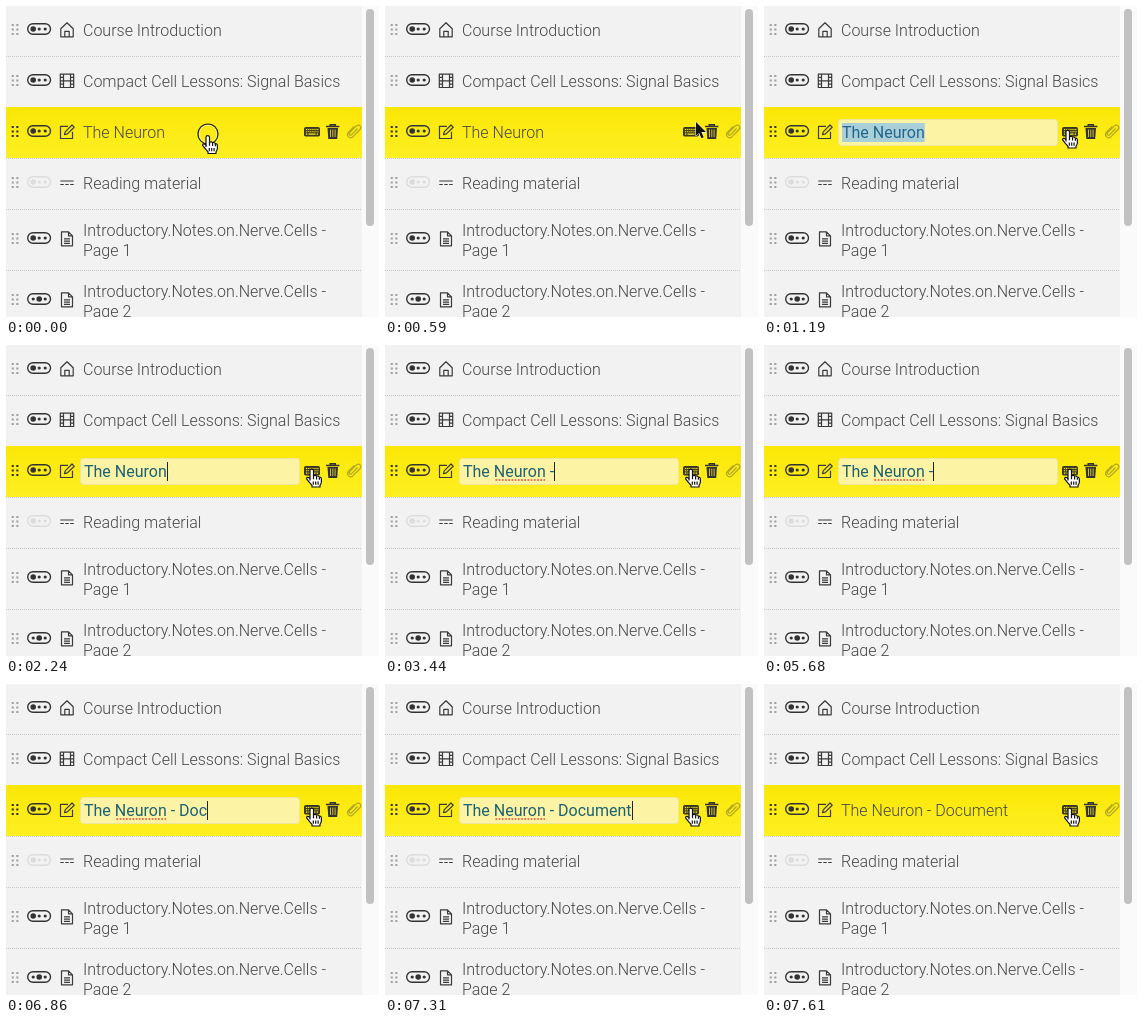
Animation of 373x311 px, one loop 8 s. Source, as an HTML page:

```html
<!DOCTYPE html>
<html lang="en">
<head>
<meta charset="utf-8">
<title>Course outline</title>
<style>
html, body { margin: 0; width: 100%; height: 100%; overflow: hidden; background: #fafafa; }
svg { display: block; }
text { font: 300 16px Roboto, "Open Sans", sans-serif; fill: #464646; white-space: pre; }
#entry { font-weight: 400; }
.icon { fill: none; stroke: #3a3a3a; stroke-width: 1.2; stroke-linejoin: round; }
.sep { stroke: #c8c8c8; stroke-dasharray: 1 1; }
</style>
</head>
<body>
<svg width="373" height="311" viewBox="0 0 373 311">
  <defs>
    <linearGradient id="glow" x2="0" y2="1">
      <stop stop-color="#fbe706"/><stop offset="1" stop-color="#fdef22"/>
    </linearGradient>
  </defs>
  <rect width="356" height="311" fill="#f2f2f2"/>
  <rect x="360" y="3" width="8" height="217" rx="4" fill="#c1c1c1"/>
  <rect y="101" width="356" height="51" fill="url(#glow)"/>
  <path class="sep" d="M0 50.5H356M0 152.5H356M0 203.5H356M0 264.5H356"/>
  <g id="rows"></g>

  <!-- row tools -->
  <g transform="translate(298 121)">
    <rect x=".5" y=".5" width="15" height="8.5" rx="1" fill="#4a4510" stroke="#333"/>
    <path d="M2 2.5H15M2 4.7H15" stroke="#f5e630" stroke-width="1.1" stroke-dasharray="1.2 .9"/>
    <path d="M2 7.1h1.3M4.5 7.1h7M12.7 7.1h1.3" stroke="#f5e630" stroke-width="1.1"/>
  </g>
  <path d="M321.5 122H332L331.2 133H322.3Z" fill="#333"/>
  <path d="M324.5 123.5v7.5M326.8 123.5v7.5M329.1 123.5v7.5" stroke="#f5e630" stroke-width=".8"/>
  <path d="M320 120.6H333.4M324.3 120.5v-1.8h5v1.8" fill="none" stroke="#333" stroke-width="1.5"/>
  <path class="icon" opacity=".38" d="M351.5 122.5l-6 6.3q-1.2 1-2-.1t.2-2l6.6-6.8q2.2-1.7 3.8 0t0 3.6l-7.3 7.4q-2.5 1.8-4.4-.2t.1-4.5l5.7-5.8"/>

  <text id="label" x="77" y="132"></text>
  <g id="field">
    <rect x="74.5" y="113.5" width="219" height="26" rx="3" fill="#fcf3a4" stroke="#f0e6a0"/>
    <rect id="selection" x="78" y="117" height="19" fill="#a9d0d8"/>
    <text id="entry" x="78" y="132"></text>
    <path id="squiggle" d="M110.5 135H160" stroke="#e8453a" stroke-width="1.6" stroke-dasharray="1.7 1.5"/>
    <rect id="caret" y="117" width="1" height="19" fill="#222"/>
  </g>

  <g id="pointer">
    <g id="ring" fill="none">
      <circle r="9" cy="-1.5" stroke="#fff" stroke-opacity=".6"/>
      <circle r="10" cy="-1.5" stroke="#222" stroke-width="1.2"/>
    </g>
    <g id="hand" stroke="#111" stroke-width="1.2" stroke-linejoin="round">
      <path fill="#fff" d="M-2 1.7Q-2 .2-.3 .2T1.5 1.7V6.8Q3.6 5.7 4.6 7.2 6.6 6.5 7.4 8.2 9.4 8 9.4 10.4V13Q9 15 8 16.3V18H0V16.3Q-3 13-5.4 9.8-5.2 7-2 9.6Z"/>
      <path fill="none" d="M-2 9.5v2M1.5 6.8v3.4M4.6 7.4v3M7.4 8.4v2.4M1.3 12.5v3.2M3.7 12.5v3.2M6.1 12.5v3.2"/>
    </g>
    <path id="arrow" fill="#111" stroke="#fff" paint-order="stroke" d="M0 0V13.8L3.1 11 5.4 16.2 7.7 15.2 5.4 10.1H10Z"/>
  </g>
</svg>
<script>
const $ = id => document.getElementById(id);
const show = (id, on) => $(id).setAttribute("visibility", on ? "inherit" : "hidden");

const icons = {
  home: "M-6.2-1L0-7 6.2-1V7H-6.2ZM-2.2 7V1.5H2.2V7",
  film: "M-6.7-6.7H6.7V6.7H-6.7ZM-3.5-6.7V6.7M3.5-6.7V6.7M-6.7 0H6.7M-6.7-3.4h3.2M-6.7 3.4h3.2M3.5-3.4h3.2M3.5 3.4h3.2",
  edit: "M1-5.5H-6.5V6.7H5.5V0M-2.5 2.8L-1.8 0 5-6.8 7.2-4.6 .4 2.1Z",
  rule: "M-6.7-1.8H6.7M-6.7 1.7h3.5M-1.7 1.7h3.4M3.2 1.7h3.5",
  page: "M-5.5-7H1.5L5.5-3V7H-5.5ZM1.5-7V-3H5.5M-3 0H3M-3 2.3H3M-3 4.5H3"
};
// centre, icon, active toggle dot, first baseline, lines of text
const rows = [
  [23.5, "home", 0, 30, "Course Introduction"],
  [74.5, "film", 0, 81, "Compact Cell Lessons: Signal Basics"],
  [125.5, "edit", 0, 132],
  [176.5, "rule", 0, 183, "Reading material"],
  [232.5, "page", 0, 230, "Introductory.Notes.on.Nerve.Cells -", "Page 1"],
  [293.5, "page", 1, 291, "Introductory.Notes.on.Nerve.Cells -", "Page 2"]
];
$("rows").innerHTML = rows.map(([y, icon, active, base, ...lines]) => {
  const ink = icon == "rule" ? "#dcdcdc" : "#333";
  const grip = [-4.5, 0, 4.5].map(d =>
    `<path d="M5.7 ${d}h2.1M10.3 ${d}h2.1" stroke="${icon == "edit" ? "#333" : "#a0a0a0"}" stroke-width="2.1"/>`);
  const dots = [27.2, 33.2, 39.2].map((x, i) =>
    `<circle cx="${x}" cy="-.5" r="${i == active ? 2.8 : 1.6}" fill="${ink}"/>`);
  return `<g transform="translate(0 ${y})">${grip.join("")}
    <rect x="21.7" y="-5.8" width="22.8" height="10.6" rx="5.3" fill="none" stroke="${ink}" stroke-width="1.4"/>
    ${dots.join("")}<path class="icon" transform="translate(61 .3)" d="${icons[icon]}"/></g>` +
    lines.map((s, i) => `<text x="77" y="${base + i * 19.5}">${s}</text>`).join("");
}).join("");

const title = "The Neuron";
// time, text after the title, caret shown
const edits = [
  [1190, "", 0], [2240, "", 1], [2840, "", 0],
  [3290, " ", 1], [3440, " -", 1], [3590, " - ", 1], [4040, " - ", 0],
  [4340, " - ch", 1], [4490, " - cha", 1],
  [5090, " - ch", 1], [5240, " - c", 1], [5380, " - ", 1],
  [5680, " -", 1], [6120, " -", 0],
  [6420, " - ", 1], [6570, " - D", 1], [6710, " - Do", 1], [6860, " - Doc", 1],
  [7010, " - Docum", 1], [7160, " - Documen", 1], [7310, " - Document", 1]
];
// time, x, y, shape
const moves = [
  [0, 202, 129.5, "ring"], [140, 225, 129, "hand"], [290, 290, 126, "hand"],
  [440, 346, 122, "hand"], [590, 311, 116, "arrow"], [740, 304.5, 126, "hand"],
  [1040, 305, 126, "ring"], [1190, 304, 124, "hand"], [1640, 306, 124, "hand"]
];
const at = (list, t) => list.findLast(item => item[0] <= t);

function draw(t) {
  const [, x, y, shape] = at(moves, t);
  $("pointer").setAttribute("transform", `translate(${x} ${y})`);
  show("ring", shape == "ring");
  show("arrow", shape == "arrow");
  show("hand", shape != "arrow");

  const editing = t >= 1190 && t < 7610;
  const selected = editing && t < 2240;
  show("field", editing);
  show("label", !editing);
  $("label").textContent = t < 1190 ? title : title + " - Document";

  const [, suffix, caret] = at(edits, t) || [0, "", 0];
  $("entry").textContent = title + suffix;
  $("entry").style.fill = selected ? "#22668f" : "#1c6273";
  const width = $("entry").getComputedTextLength();
  $("selection").setAttribute("width", width);
  $("caret").setAttribute("x", Math.round(78 + width));
  show("selection", selected);
  show("squiggle", editing && t >= 3290);
  show("caret", editing && caret);
}

function tick() {
  draw(performance.now() % 8000);
  requestAnimationFrame(tick);
}
tick();
</script>
</body>
</html>
```
